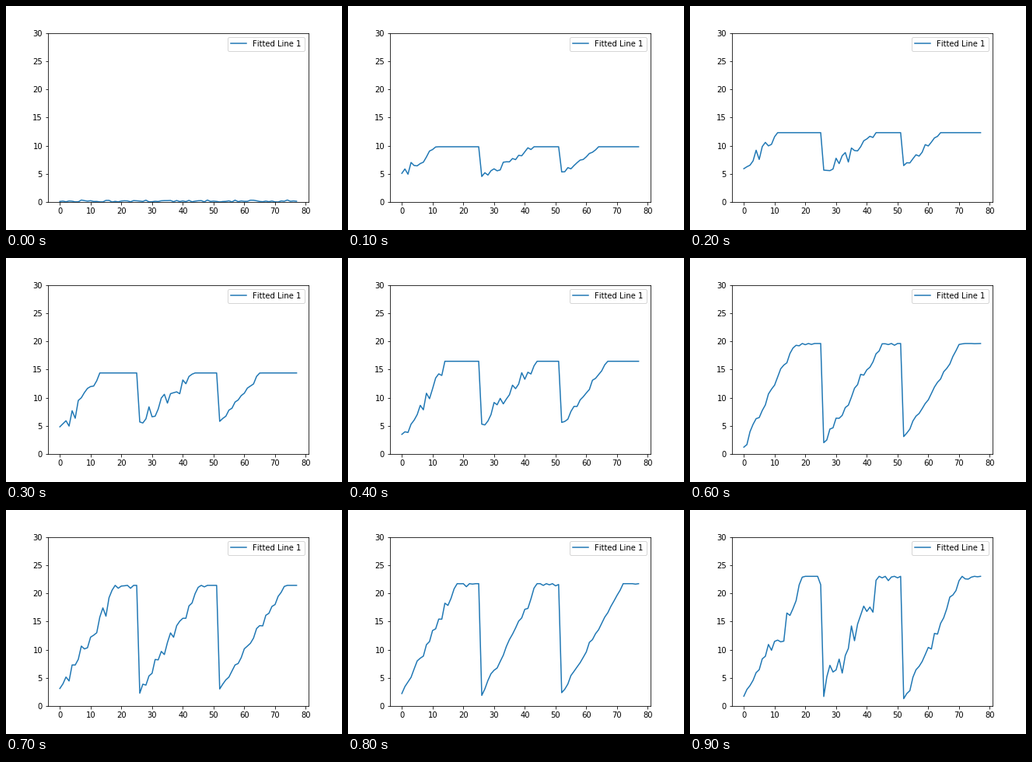
A matplotlib script for the animation above (1000 ms loop, 432 px wide and 288 px high).

```python
import numpy as np
import matplotlib.pyplot as plt
from matplotlib.animation import FuncAnimation

WIDTH, HEIGHT, DPI = 432, 288, 72
FRAMES, RAMPS, SAMPLES = 10, 3, 26
STEADINESS = (1, .8, .4)  # later ramps wobble less

# Per key step: plateau, wobble, start of each ramp, samples each ramp climbs.
KEYS = {
    1: (9.8, .6, (5, 4.5, 5.2), (12, 17, 12)),
    2: (12.3, .7, (6.3, 5.2, 6.4), (12, 17, 12)),
    4: (16.45, .9, (3, 5.5, 5.6), (15, 18, 15)),
    6: (19.6, .5, (1.6, 2.2, 3), (16.5, 19, 18.5)),
    7: (21.4, 1, (2.6, 3, 3), (18, 20, 21)),
    8: (21.7, .6, (2.5, 2.2, 2.4), (18, 18, 20)),
    9: (23, 1.7, (2, 2.6, 1), (20, 19, 19)),
}


def settings(step):
    """Blend the key steps into plateau, wobble, starts and spans."""
    rows = [np.hstack(row) for row in KEYS.values()]
    blend = [np.interp(step, list(KEYS), column) for column in zip(*rows)]
    return blend[0], blend[1], blend[2:5], blend[5:8]


def fit(step):
    """Three ramps that climb to a plateau, each with a seeded wobble."""
    rng = np.random.default_rng(20 + step)
    if step == 0:
        return rng.uniform(0, .35, RAMPS * SAMPLES)
    plateau, wobble, starts, spans = settings(step)
    t = np.arange(SAMPLES)
    parts = []
    for start, span, steadiness in zip(starts, spans, STEADINESS):
        climb = np.minimum(t / span, 1) ** 1.06
        rest = .4 if step > 4 else 0
        noise = rng.normal(0, wobble * steadiness, SAMPLES)
        noise *= np.where(climb < 1, np.minimum(1, .4 + t / 6), rest)
        parts.append(start + (plateau - start) * climb + noise)
    return np.clip(np.concatenate(parts), .3, plateau)


plt.rcParams.update({"font.family": "DejaVu Sans", "font.size": 10,
                     "text.kerning_factor": 6})
fig = plt.figure(figsize=(WIDTH / DPI, HEIGHT / DPI), dpi=DPI)
ax = fig.add_axes([0.125, 0.125, 0.775, 0.755])
line, = ax.plot(fit(0), color="#1f77b4", lw=1.5, label="Fitted Line 1")
ax.set_xlim(-3.85, 80.85)
ax.set_ylim(0, 30)
ax.set_xticks(range(0, 81, 10))
ax.legend(loc="upper right")


def draw(step):
    line.set_ydata(fit(step))
    return line,


animation = FuncAnimation(fig, draw, frames=FRAMES, interval=100,
                          repeat=True, repeat_delay=0)
plt.show()
```
